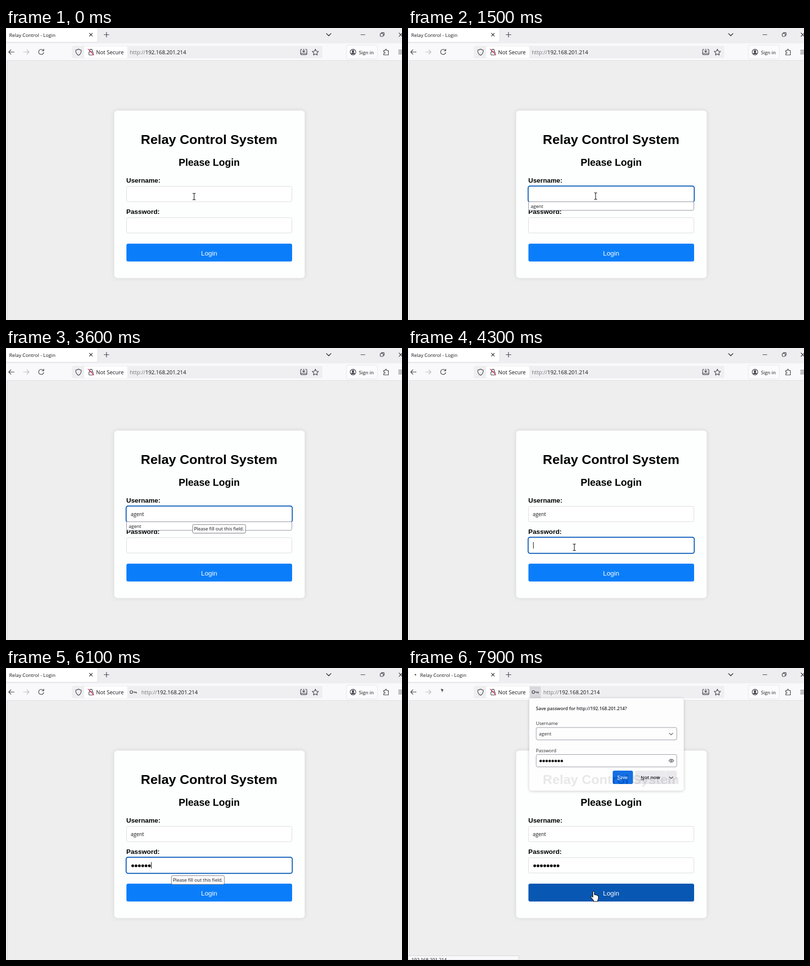
An HTML page for the animation above (8 s loop, 800 by 589 pixels).

```html
<!DOCTYPE html>
<html lang="en">
<head>
<meta charset="utf-8">
<title>Relay Control - Login</title>
<style>
  html, body { margin: 0; width: 100%; height: 100%; overflow: hidden; background: #eee; }
  svg { display: block; width: 800px; height: 589px; }
  text { font-family: "Open Sans", "Noto Sans", sans-serif; fill: #15141a; white-space: pre; }
  .page { font: 13.35px "Liberation Sans", Arial, sans-serif; }
  .bold { font-weight: 700; fill: #000; }
  .mid { text-anchor: middle; }
  .icon { fill: none; stroke: #3a3944; stroke-width: 1.15; stroke-linecap: round; stroke-linejoin: round; }
  .field { fill: #fff; stroke: #dcdcdc; }
  .field.focus { stroke: #0a5cb8; stroke-width: 2; }
  .soft { filter: drop-shadow(0 0 4px rgba(0, 0, 0, .11)); }
  .panel { filter: drop-shadow(0 1px 3px rgba(0, 0, 0, .22)); }
</style>
</head>
<body>
<svg viewBox="0 0 800 589">
  <defs>
    <path id="key" d="M250.5 48.5a2.8 2.8 0 1 0 5.6 0a2.8 2.8 0 1 0-5.6 0M256.2 48.5H263.5V51M260.6 48.5V50.6"/>
    <path id="chevron" d="M-3.5-1.6L0 1.8L3.5-1.6"/>
  </defs>

  <!-- Browser chrome -->
  <rect width="800" height="32" fill="#eeeef1"/>
  <path d="M0 0H185V25Q185 28.5 181.5 28.5H0Z" fill="#fff" stroke="#dddde2" stroke-width=".8"/>
  <rect y="31" width="800" height="35" fill="#f9f9fb"/>
  <rect x="2" y="65" width="798" height="1" fill="#dedee2"/>
  <rect x="0" y="66" width="3" height="523" fill="#f6f6f8"/>
  <rect x="2" y="66" width="1" height="523" fill="#d9d9dd"/>
  <circle id="spinner" cx="15" cy="13.5" r="1.6" fill="#555"/>
  <text id="tabTitle" y="17.5" font-size="9.75">Relay Control - Login</text>
  <g class="icon">
    <path d="M168.5 10.5l6 6m0-6l-6 6M198 13.5h10m-5-5v10M717 13.5h8M794 10l6.5 7m0-7l-6.5 7"/>
    <use href="#chevron" transform="translate(652 13.3) scale(1.3)"/>
    <path d="M758 10.8v-.3q0-1.2 1.2-1.2h3.5q1.3 0 1.3 1.3v3.3q0 1.2-1.2 1.2"/>
    <rect x="756" y="11" width="6" height="6" rx="1.2"/>
    <path d="M16.5 48.5H5.5M10 44L5.5 48.5L10 53"/>
    <path d="M35.5 48.5H46.500M42 44L46.500 48.500L42 53" stroke="#b9b9c0"/>
    <path id="reload" d="M75.5 45.300A5.200 5.200 0 1 0 76.200 49.500M76.300 42.500V46H72.800"/>
    <path id="stop" d="M67 42.500l4 1.500-2 2zM69 45v3" fill="#444"/>
  </g>
  <rect x="133" y="36" width="506" height="25" rx="3.500" fill="#efeff2"/>
  <rect x="158" y="37" width="87" height="23.500" rx="3" fill="#fff"/>
  <rect x="687.500" y="34.500" width="63" height="28" rx="3.500" fill="#fbfbfd" stroke="#e5e5ea"/>
  <g class="icon">
    <path d="M146.500 42.500Q149 44.300 152 44.500Q152.500 52 146.500 55Q140.500 52 141 44.500Q144 44.300 146.500 42.500Z"/>
    <rect x="167.500" y="48" width="8.500" height="6.500" rx="1.200"/>
    <path d="M169.300 48v-2.500q0-2.600 2.500-2.600t2.500 2.600V48"/>
    <path d="M166 42.500l11.500 12" stroke="#d7264c"/>
    <path d="M598 43h-1.500q-1.300 0-1.300 1.300v8q0 1.300 1.300 1.300h10q1.300 0 1.300-1.300v-8q0-1.300-1.300-1.300H605M601.500 42.500v6m-2.500-2.300l2.500 2.500 2.500-2.500M595.500 51h12"/>
    <path d="M625 42.700l1.900 4 4.300.6-3.100 3 .7 4.300-3.800-2-3.800 2 .7-4.300-3.100-3 4.300-.6z"/>
    <circle cx="701" cy="48.500" r="5.700"/>
    <circle cx="701" cy="46.700" r="1.700" fill="#3a3944"/>
    <path d="M698 51.800q0-2 3-2t3 2z" fill="#3a3944"/>
    <path d="M763 45.500h3v-1.200q0-1.500 1.500-1.500t1.500 1.500v1.200h3.500v8.700H763v-2.700h1q1.700 0 1.700-1.500t-1.700-1.500h-1z"/>
    <path d="M793 45H800M793 48.500H800M793 52H800"/>
  </g>
  <text x="182" y="53" font-size="10.9">Not Secure</text>
  <text id="url" y="53" font-size="10.75"><tspan fill="#77767e">http://</tspan>192.168.201.214</text>
  <text x="713" y="52.500" font-size="9.700">Sign in</text>
  <rect id="keyBack" x="246" y="37" width="22" height="24" fill="#d9d9dd"/>
  <use id="keyIcon" class="icon" href="#key"/>

  <!-- Login page -->
  <rect class="soft" x="218.500" y="166.500" width="385" height="338" rx="7" fill="#fdfefe"/>
  <text class="page bold mid" x="410.300" y="234" style="font-size:26.700px;font-weight:700">Relay Control System</text>
  <text class="page bold mid" x="410.500" y="278" style="font-size:20px;font-weight:700">Please Login</text>
  <text class="page bold" x="243" y="311.500" style="font-weight:700">Username:</text>
  <text class="page bold" x="243" y="375" style="font-weight:700">Password:</text>
  <rect id="userField"/>
  <rect id="passField"/>
  <text id="userText" x="252" y="338.800" font-size="10.200"></text>
  <g id="passDots"></g>
  <rect id="caret" width="1" height="13" fill="#000"/>
  <rect id="button" x="243.300" y="435" width="334.700" height="36" rx="3.500"/>
  <text class="page mid" x="410.300" y="458.500" style="fill:#fff">Login</text>

  <g id="dropdown">
    <path d="M243.500 350.500H577.500V364.500Q577.500 367.800 574 367.800H247Q243.500 367.800 243.500 364.500Z" fill="#fff" stroke="#8f8f9d"/>
    <text x="248" y="363" font-size="9.500">agent</text>
  </g>
  <g id="tooltip">
    <rect x=".5" y=".5" width="107" height="17.500" rx="2.500" fill="#fdfdfd" stroke="#77767e"/>
    <text x="3.200" y="12.800" font-size="9.450">Please fill out this field.</text>
  </g>

  <!-- Save password panel -->
  <g id="popup">
    <rect class="panel" x="245" y="61" width="312" height="186.500" rx="5" fill="#fff"/>
    <text x="258.500" y="85" font-size="9.050" font-weight="600">Save password for http://192.168.201.214?</text>
    <text x="258.500" y="115" font-size="9.150">Username</text>
    <text x="258.500" y="169.500" font-size="9.150">Password</text>
    <g fill="#fff" stroke="#8f8f9d">
      <rect x="259" y="120" width="284" height="25" rx="3"/>
      <rect x="259" y="174.500" width="284" height="25" rx="3"/>
    </g>
    <text x="264.500" y="136" font-size="9.500">agent</text>
    <g id="popupDots"></g>
    <rect x="413.500" y="207" width="41" height="27" rx="3.500" fill="#0061e0"/>
    <path d="M459 207H539.500Q543 207 543 210.500V230.500Q543 234 539.500 234H459Z" fill="#e9e9ed"/>
    <path d="M520 207v27" stroke="#f4f4f6"/>
    <text x="423" y="224" font-size="9.250" font-weight="600" style="fill:#fff"><tspan text-decoration="underline">S</tspan>ave</text>
    <text x="470" y="224" font-size="9.600" font-weight="600"><tspan text-decoration="underline">N</tspan>ot now</text>
    <g class="icon">
      <use href="#chevron" x="531.500" y="133"/>
      <use href="#chevron" x="531.500" y="221"/>
      <path d="M527 187q5-6.500 10 0q-5 6.500-10 0z"/>
      <circle cx="532" cy="187" r="1.500"/>
    </g>
  </g>
  <g id="status">
    <path d="M0 580.500H224V589H0Z" fill="#f9f9fb" stroke="#d5d5da"/>
    <text x="7" y="592" font-size="9.300">192.168.201.214</text>
  </g>

  <!-- Pointers, hot spot at the origin -->
  <g id="beam" fill="none" stroke="#111" stroke-width="1.150">
    <path d="M-3-6.500H-1Q0-6.500 0-5.500Q0-6.500 1-6.500H3M0-5.500V5.500M-3 6.500H-1Q0 6.500 0 5.500Q0 6.500 1 6.500H3"/>
  </g>
  <path id="arrow" d="M0 0V14L3.300 11L5.500 16L7.800 15L5.600 10.200H10Z" fill="#fff" stroke="#111"/>
  <path id="hand" fill="#fff" stroke="#111" stroke-width="1.100" stroke-linejoin="round"
    d="M-1.500 12V1.500Q-1.500 0 0 0T1.500 1.500V7Q3.800 5.800 4.400 7.600Q6.600 6.600 7.200 8.500Q9.500 8 9.500 10.500V14Q9.500 16.500 8 18V20.500H0V18.500Q-2.500 16-4.800 12.500Q-6 10.500-4.600 9.900Q-3.400 9.400-1.500 12Z"/>
</svg>
<script>
const LOOP = 8000, STEP = 100, NAME = "agent";
const at = {
  userClick: 700, list: 1000, userType: 2100, userTip: 2000,
  moveDown: 3800, passClick: 4300, passType: 4600, passTip: 4800,
  moveButton: 6800, hover: 7200, press: 7500, load: 7700, popup: 7800
};
const userKey = 250, passKey = 300;
const $ = id => document.getElementById(id);
const show = (id, on) => $(id).setAttribute("display", on ? "inline" : "none");
const set = (id, attrs) => Object.entries(attrs).forEach(([k, v]) => $(id).setAttribute(k, v));
const clamp = v => Math.max(0, Math.min(1, v));
const between = (t, a, b) => t >= a && t < b;
const mix = (a, b, k) => a + (b - a) * k;
const ease = k => k * k * (3 - 2 * k);
const typed = (t, start, gap, max) => t < start ? 0 : Math.min(max, 1 + Math.floor((t - start) / gap));

const path = [
  [0, 380, 340], [600, 379, 339], [at.moveDown, 379, 339], [4200, 336, 402],
  [at.moveButton, 336, 402], [at.hover, 373, 438], [at.press, 375, 450.5], [LOOP, 375, 450.5]
];

function pointer(t) {
  const i = path.findIndex((p, n) => n && t <= p[0]);
  const [a, b] = [path[i - 1], path[i]];
  const k = ease(clamp((t - a[0]) / (b[0] - a[0])));
  return [mix(a[1], b[1], k), mix(a[2], b[2], k)];
}

function dots(id, count, x, y, gap, r) {
  $(id).innerHTML = Array.from({ length: count }, (_, i) =>
    `<circle cx="${x + i * gap}" cy="${y}" r="${r}"/>`).join("");
}

function field(id, y, focused) {
  const g = focused ? 0.8 : 0;
  set(id, {
    class: focused ? "field focus" : "field",
    x: 243.5 - g, y: y - g, width: 334 + 2 * g, height: 31 + 2 * g, rx: focused ? 4 : 3
  });
}

function render(t) {
  const userFocus = between(t, at.userClick, at.passClick);
  const passFocus = between(t, at.passClick, at.press);
  const letters = typed(t, at.userType, userKey, NAME.length);
  const count = typed(t, at.passType, passKey, 8);
  const loading = t >= at.load;

  field("userField", 319.5, userFocus);
  field("passField", 382.5, passFocus);
  $("userText").textContent = NAME.slice(0, letters);
  dots("passDots", count, 256, 399, 6.72, 2.75);

  const lastInput = userFocus
    ? (letters ? at.userType + (letters - 1) * userKey : t >= at.list ? at.list : at.userClick)
    : (count ? at.passType + (count - 1) * passKey : at.passClick);
  show("caret", (userFocus || passFocus) && (t - lastInput) % 1000 < 500);
  const caretX = userFocus
    ? 252 + (letters ? $("userText").getComputedTextLength() : 0)
    : 252.8 + count * 6.72;
  set("caret", { x: caretX, y: userFocus ? 328.5 : 391.5 });

  show("dropdown", between(t, at.list, at.passClick));
  const userTip = between(t, at.userTip, at.moveDown);
  show("tooltip", userTip || between(t, at.passTip, at.moveButton));
  set("tooltip", { transform: userTip ? "translate(376.5 355.5)" : "translate(333.7 418.3)" });

  const h = clamp((t - at.hover) / 300);
  set("button", { fill: `rgb(${mix(10, 8, h)},${mix(126, 87, h)},${mix(250, 178, h)})` });

  const hasKey = count > 0;
  set("url", { x: hasKey ? 273.5 : 250 });
  show("keyIcon", hasKey);
  show("keyBack", t >= at.popup);
  set("tabTitle", { x: loading ? 24.5 : 6.5 });
  ["spinner", "stop", "status"].forEach(id => show(id, loading));
  show("reload", !loading);
  show("popup", t >= at.popup);
  set("popup", { opacity: t < at.popup + STEP ? 0.55 : 0.91 });

  const [x, y] = pointer(t);
  const hidden = between(t, at.userType, at.moveDown) || between(t, at.passType, at.moveButton);
  const shape = t < at.moveButton || y < 414 ? "beam" : y < 435 ? "arrow" : "hand";
  for (const id of ["beam", "arrow", "hand"]) {
    show(id, !hidden && id === shape);
    set(id, { transform: `translate(${x} ${y})` });
  }
}

dots("popupDots", 8, 268, 187.5, 6.1, 2.5);
const begin = performance.now();
function tick() {
  const t = (performance.now() - begin) % LOOP;
  render(Math.floor(t / STEP) * STEP);
  requestAnimationFrame(tick);
}
tick();
</script>
</body>
</html>
```
